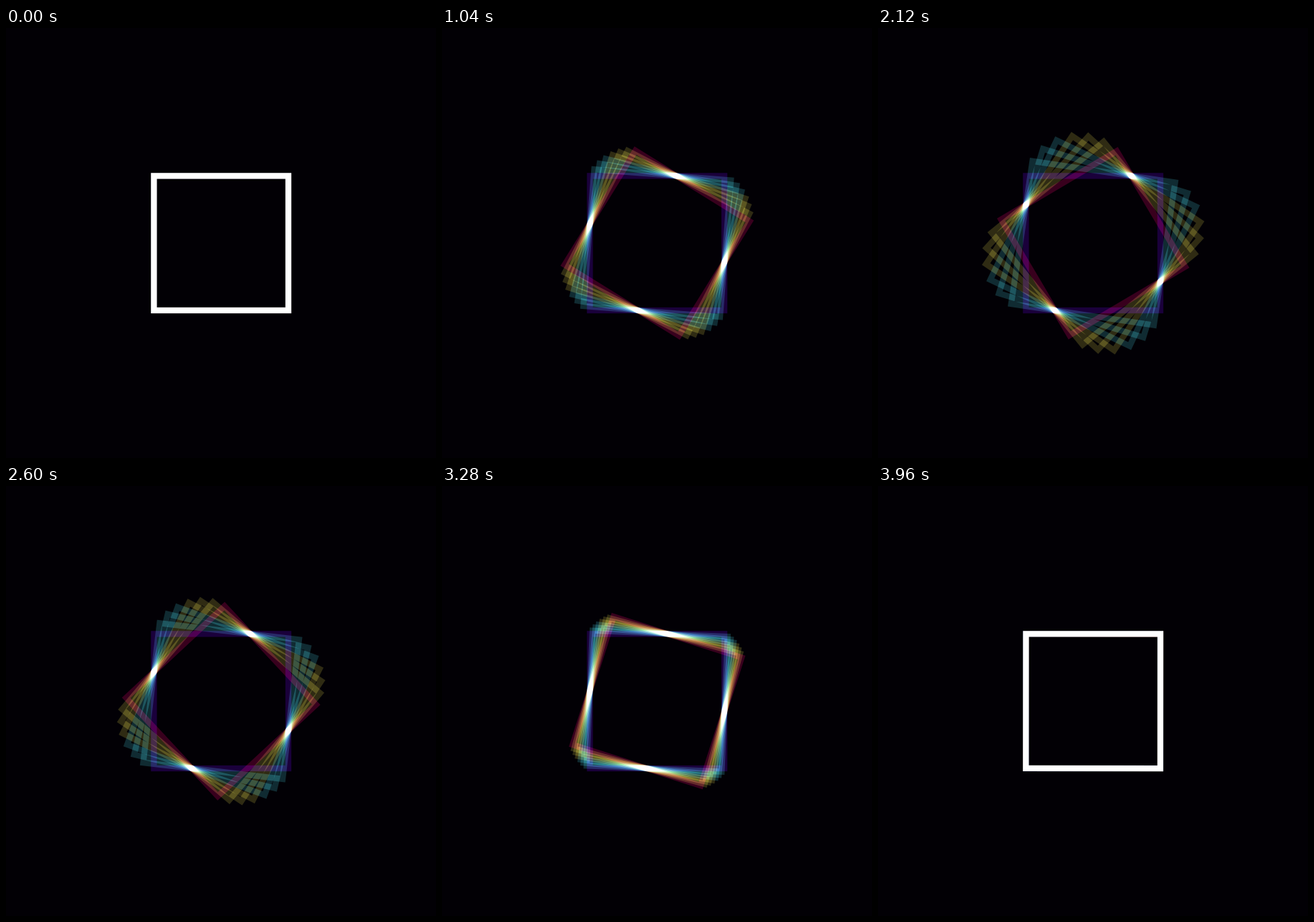
Recreate the animation shown at these times as an HTML page with a canvas. Size 600 by 600 pixels, loop 4.08 s.

```html
<!DOCTYPE html>
<html>
<head>
<meta charset="utf-8">
<style>
html, body { margin: 0; width: 100%; height: 100%; overflow: hidden; background: #020005; }
canvas { display: block; }
</style>
</head>
<body>
<canvas id="stage" width="600" height="600"></canvas>
<script>
const ctx = document.getElementById('stage').getContext('2d');
const LOOP = 4080, STEP = 40, STEPS = 100;
const CENTER = 300.2, HALF = 93.8, STROKE = 8.3;
const MAX_TURN = Math.PI / 3;

// Light split over the fan of squares; together they add up to white.
const BLUE = 'rgb(24,0,54)', TEAL = 'rgb(14,43,45)', OLIVE = 'rgb(45,43,14)', RED = 'rgb(54,0,24)';
const COLORS = [BLUE, TEAL, TEAL, TEAL, OLIVE, OLIVE, OLIVE, RED];

const ease = p => p * p * (3 - 2 * p);

function drawSquare(angle, half, color) {
  ctx.save();
  ctx.translate(CENTER, CENTER);
  ctx.rotate(angle);
  ctx.strokeStyle = color;
  ctx.strokeRect(-half, -half, 2 * half, 2 * half);
  ctx.restore();
}

function draw(time) {
  const step = Math.min(Math.floor(time % LOOP / STEP), STEPS - 1);
  const turn = MAX_TURN * ease(1 - Math.abs(1 - 2 * step / STEPS));

  ctx.globalCompositeOperation = 'source-over';
  ctx.fillStyle = '#020005';
  ctx.fillRect(0, 0, 600, 600);

  ctx.globalCompositeOperation = 'lighter';
  ctx.lineWidth = STROKE;
  COLORS.forEach((color, i) => {
    const angle = turn * i / (COLORS.length - 1);
    // Sized so that each side always passes through the same pivot point.
    const half = HALF * Math.cos(turn / 2 - angle) / Math.cos(turn / 2);
    drawSquare(angle, half, color);
  });
}

function tick() {
  draw(performance.now());
  requestAnimationFrame(tick);
}
tick();
</script>
</body>
</html>
```
